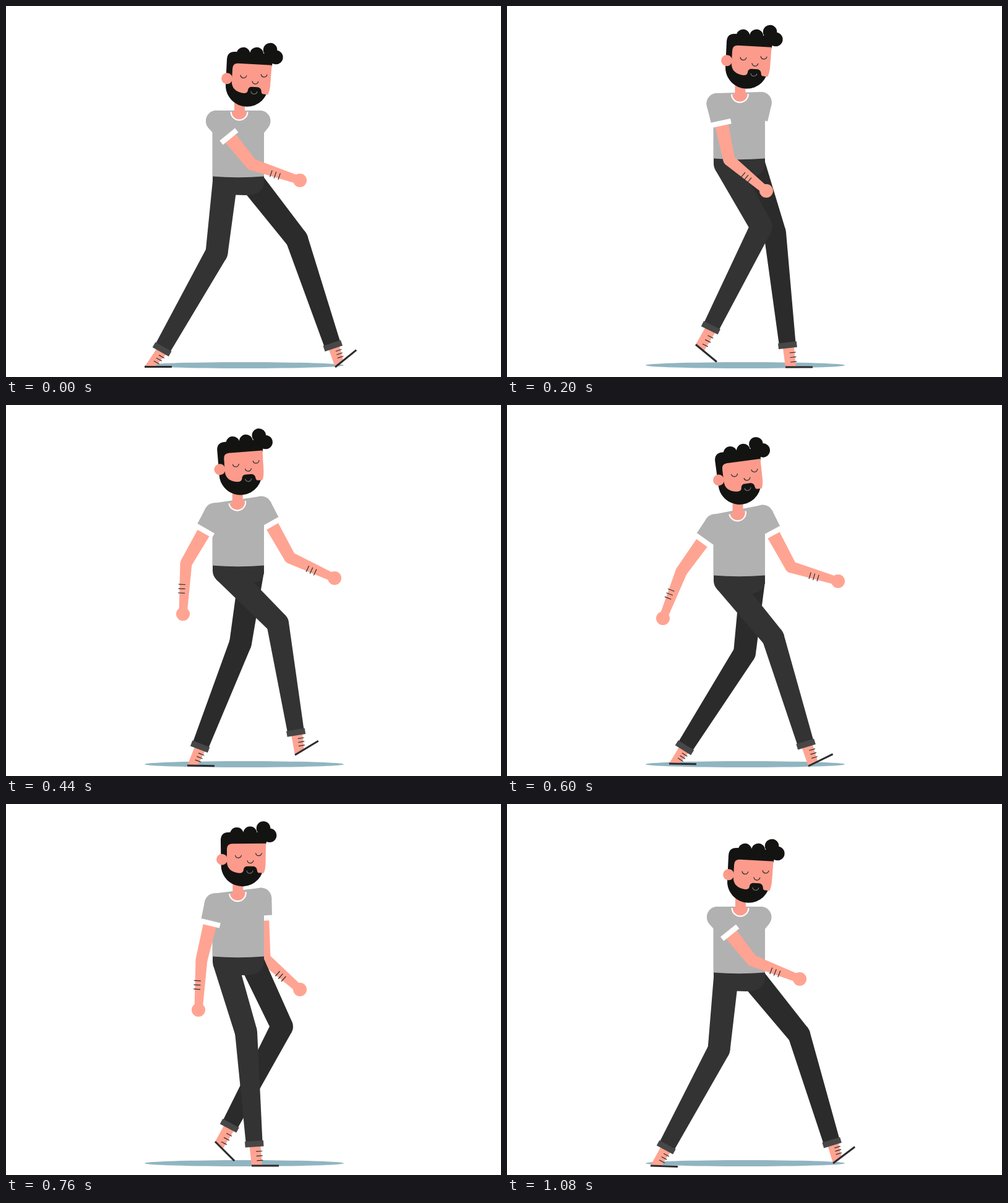
An HTML page with a canvas that plays this animation: 800x600 px, repeating every 1.12 s.

```html
<!DOCTYPE html>
<html lang="en">
<head>
<meta charset="utf-8">
<title>Walk cycle</title>
<style>
html, body { margin: 0; width: 100%; height: 100%; overflow: hidden; background: #fff; }
canvas { display: block; width: 800px; height: 600px; }
</style>
</head>
<body>
<canvas id="stage" width="800" height="600"></canvas>
<script>
const ctx = document.getElementById('stage').getContext('2d');
const STEP = 40, CYCLE = 28, HALF = 14;
const SKIN = '#ffa492', FACE = '#fc9b8b', HAIR = '#131412', SHIRT = '#b1b1b1';
const PANTS = '#333333', PANTS_FAR = '#2b2b2b', CUFF = '#474747', INK = '#2b2b2f';

const KEYS = [0, 5, 11, 15, 19, 23, 27];

// Periodic cubic through uneven keys.
function track(ts, vs, period = CYCLE) {
  const n = ts.length;
  const gap = i => (ts[(i + 1) % n] - ts[i] + period) % period;
  const slope = i => (vs[(i + 1) % n] - vs[i]) / gap(i);
  const tangent = i => {
    const p = (i + n - 1) % n;
    return (gap(i) * slope(p) + gap(p) * slope(i)) / (gap(p) + gap(i));
  };
  return t => {
    t = (t % period + period) % period;
    let i = n - 1;
    while (i > 0 && ts[i] > t) i--;
    const h = gap(i), s = (t - ts[i]) / h, j = (i + 1) % n;
    const s2 = s * s, s3 = s2 * s;
    return vs[i] * (2 * s3 - 3 * s2 + 1) + vs[j] * (3 * s2 - 2 * s3) +
      h * (tangent(i) * (s3 - 2 * s2 + s) + tangent(j) * (s3 - s2));
  };
}

const lift = track([0, 1, 5, 9, 11, 13], [0, 0, -29, -29, -16, -3], HALF);
const tilt = track(KEYS, [0, 1, 5.5, 7.5, 4.5, 0, 0]);
const headX = track(KEYS, [380, 378, 368.5, 365, 372, 378, 381]);
const headTurn = track(KEYS, [3.5, 3.5, -4, -7, 0, 3.5, 3.5]);
const belt = t => 276 + lift(t);

const shoulderNear = t => [340 - tilt(t) * 0.5, belt(t) - 90 + tilt(t)];
const shoulderFar = t => [410.5 + tilt(t) * 0.4, belt(t) - 90 - tilt(t)];

// Per key: knee x y, ankle x y, heel x y, sole angle.
const LEG_NEAR = [
  [340.5, 399, 254, 552, 224, 583.5, 0],
  [411, 357, 331, 517, 305, 547.5, 39.5],
  [439, 353, 468, 526, 467, 566, -31],
  [430, 376, 482, 545, 487, 584, -26],
  [388, 369, 401, 546, 397, 585, 0],
  [348, 374, 321, 547, 306, 585.5, 1],
  [342.5, 397, 259, 552, 232, 585, 2]
];
const LEG_FAR = [
  [470, 377, 527, 546, 532, 584, -39],
  [433, 367, 453, 545, 450, 584, 0],
  [379, 385, 315, 549, 293, 583, 1],
  [384, 401, 289, 551, 262, 580, 1],
  [446, 360, 363, 517, 338, 546, 45],
  [483, 338, 464, 510, 452, 545, -10],
  [472, 373, 524, 544, 527, 581, -37]
];
// Distance between the legs half a cycle apart.
const MEAN = [40, 0.5, 42, -0.5, 43, -1, 0], SWAY = [5, -2.5, 10, -0.5, 10, 0, 0];
const spread = (t, c) => MEAN[c] + SWAY[c] * Math.cos(2 * Math.PI * (t - 19) / CYCLE);

// Each leg also learns from the other leg's opposite phase.
function legTracks(own, other, sign) {
  return MEAN.map((_, c) => {
    const pts = KEYS.map((t, i) => [t, own[i][c]]);
    KEYS.forEach((t, i) => {
      const u = (t + HALF) % CYCLE;
      if (!KEYS.includes(u)) pts.push([u, other[i][c] + sign * spread(sign > 0 ? t : u, c)]);
    });
    pts.sort((a, b) => a[0] - b[0]);
    return track(pts.map(p => p[0]), pts.map(p => p[1]));
  });
}
const legNear = legTracks(LEG_NEAR, LEG_FAR, -1);
const legFar = legTracks(LEG_FAR, LEG_NEAR, 1);

// Per key: elbow x y, hand x y; stored as swinging angles and lengths.
function armTracks(shoulder, rows) {
  const polar = (a, b) => {
    const x = b[0] - a[0], y = b[1] - a[1];
    return [Math.atan2(x, y), Math.hypot(x, y)];
  };
  const vals = rows.map((r, i) => {
    const e = r.slice(0, 2);
    return [...polar(shoulder(KEYS[i]), e), ...polar(e, r.slice(2))];
  });
  return [0, 1, 2, 3].map(c => track(KEYS, vals.map(v => v[c])));
}
const armNear = armTracks(shoulderNear, [
  [397, 256, 475, 282], [359, 249, 419, 299], [291, 256, 286, 338],
  [282, 269, 252, 345], [316, 252, 311, 333], [371, 246, 414, 312], [396, 253, 473, 283]
]);
const armFar = armTracks(shoulderFar, [
  [357, 259, 350, 340], [393, 246, 404, 325], [459, 247, 531, 280],
  [459, 262, 535, 285], [418, 250, 475, 300], [374, 238, 386, 317], [357, 255, 351, 337]
]);

const along = (p, d, k) => [p[0] + d[0] * k, p[1] + d[1] * k];
const mix = (a, b, k) => [a[0] + (b[0] - a[0]) * k, a[1] + (b[1] - a[1]) * k];
const right = d => [d[1], -d[0]];
function unit(a, b) {
  const x = b[0] - a[0], y = b[1] - a[1], l = Math.hypot(x, y);
  return [x / l, y / l];
}

function poly(color, ...pts) {
  ctx.fillStyle = color;
  ctx.beginPath();
  pts.forEach(p => ctx.lineTo(p[0], p[1]));
  ctx.fill();
}
function disc(color, p, r) {
  ctx.fillStyle = color;
  ctx.beginPath();
  ctx.arc(p[0], p[1], r, 0, 2 * Math.PI);
  ctx.fill();
}
function line(a, b, width, color = INK) {
  ctx.strokeStyle = color;
  ctx.lineWidth = width;
  ctx.beginPath();
  ctx.moveTo(a[0], a[1]);
  ctx.lineTo(b[0], b[1]);
  ctx.stroke();
}
function taper(color, a, b, wa, wb) {
  const n = right(unit(a, b));
  poly(color, along(a, n, -wa), along(a, n, wa), along(b, n, wb), along(b, n, -wb));
}

function drawLeg(tracks, t, hip, color) {
  const [kx, ky, ax, ay, hx, hy, deg] = tracks.map(f => f(t));
  const knee = [kx, ky], ankle = [ax, ay], heel = [hx, hy];
  const down = unit(knee, ankle), front = right(down);
  const turn = deg * Math.PI / 180, sole = [Math.cos(turn), Math.sin(turn)];

  const top = along(along(ankle, down, 6), front, 1);
  const shin = along(top, front, 9), toe = along(heel, sole, 17);
  poly(SKIN, along(top, front, -9), shin, toe, heel);
  for (const k of [0.3, 0.52, 0.74]) {
    const p = mix(shin, toe, k);
    line(along(p, front, -8), along(p, front, 2), 1.2);
  }
  line(heel, along(heel, sole, 44), 3);

  disc(color, hip, 20);
  taper(color, hip, knee, 20, 18);
  disc(color, knee, 18);
  taper(color, knee, ankle, 18, 13.5);
  taper(CUFF, along(ankle, down, -1), along(ankle, down, 8.5), 15, 15);
}

function drawArm(tracks, t, shoulder) {
  const [a, la, b, lb] = tracks.map(f => f(t));
  const upper = [Math.sin(a), Math.cos(a)], fore = [Math.sin(b), Math.cos(b)];
  const elbow = along(shoulder, upper, la), hand = along(elbow, fore, lb);
  taper(SKIN, along(shoulder, upper, 30), elbow, 11, 9.5);
  disc(SKIN, elbow, 9.5);
  taper(SKIN, elbow, hand, 9.5, 6.5);
  disc(SKIN, hand, 11);
  const side = right(fore);
  for (const k of [0.42, 0.505, 0.59]) {
    const p = along(elbow, fore, lb * k);
    line(along(p, side, -10), along(p, side, 1), 1.2);
  }
  disc(SHIRT, shoulder, 17);
  taper(SHIRT, shoulder, along(shoulder, upper, 29), 17, 16);
  taper('#fff', along(shoulder, upper, 28), along(shoulder, upper, 36.5), 16, 16);
}

function drawPelvis(y) {
  ctx.fillStyle = PANTS;
  ctx.beginPath();
  ctx.moveTo(334, y - 4);
  ctx.lineTo(417, y - 4);
  ctx.lineTo(417, y + 10);
  ctx.quadraticCurveTo(415, y + 30, 386, y + 30);
  ctx.lineTo(356, y + 29);
  ctx.lineTo(334, y + 8);
  ctx.fill();
}

function drawShirt(y, l, r, lean) {
  ctx.fillStyle = SHIRT;
  ctx.beginPath();
  ctx.moveTo(l[0], l[1] - 17);
  ctx.lineTo(r[0], r[1] - 17);
  ctx.lineTo(417, r[1]);
  ctx.lineTo(417, y - 0.5);
  ctx.quadraticCurveTo(375, y + 3, 333.5, y - 0.5);
  ctx.lineTo(333.5, l[1]);
  ctx.fill();
  disc(SHIRT, l, 17);

  const x = 377 - lean * 0.6, cy = y - 105 + lean * 0.4;
  const turn = Math.atan2(r[1] - l[1], r[0] - l[0]);
  for (const [color, radius] of [['#fff', 14.5], [FACE, 12.3]]) {
    ctx.fillStyle = color;
    ctx.beginPath();
    ctx.arc(x, cy, radius, turn, turn + Math.PI);
    ctx.fill();
  }
  ctx.fillStyle = FACE;
  ctx.fillRect(x - 8, cy - 30, 17, 34);
}

function smile(x, y, color) {
  ctx.strokeStyle = color;
  ctx.lineWidth = 1.2;
  ctx.beginPath();
  ctx.arc(x, y, 5, 0.1, Math.PI - 0.1);
  ctx.stroke();
}

function drawHead(x, y, deg) {
  ctx.save();
  ctx.translate(x, y);
  ctx.rotate(deg * Math.PI / 180);
  ctx.translate(-372, -91);

  ctx.fillStyle = HAIR;
  ctx.beginPath();
  ctx.moveTo(347.5, 99);
  ctx.lineTo(347, 59);
  ctx.quadraticCurveTo(347, 46, 360, 46);
  ctx.lineTo(424, 46);
  ctx.lineTo(420, 66);
  ctx.lineTo(400, 100);
  ctx.lineTo(416.5, 110);
  ctx.arc(382, 99, 34.5, 0.35, Math.PI);
  ctx.fill();
  for (const [cx, cy, r] of [[373, 49, 11], [394.5, 47.5, 11], [416, 39.5, 11.3], [426, 51, 11.3]])
    disc(HAIR, [cx, cy], r);

  ctx.fillStyle = FACE;
  ctx.beginPath();
  ctx.moveTo(357, 73);
  ctx.quadraticCurveTo(357, 65, 365, 64.5);
  ctx.lineTo(420, 64);
  ctx.lineTo(419.5, 98);
  ctx.quadraticCurveTo(419, 107, 416.5, 112);
  ctx.lineTo(408, 111.5);
  ctx.quadraticCurveTo(406, 111, 405.5, 106);
  ctx.quadraticCurveTo(404, 101, 399, 101);
  ctx.lineTo(390, 101);
  ctx.quadraticCurveTo(385, 101, 384, 106);
  ctx.quadraticCurveTo(384, 112, 377, 112);
  ctx.quadraticCurveTo(357, 110, 357, 93);
  ctx.fill();
  disc(FACE, [349, 90], 9);

  smile(375.5, 82.5, INK);
  smile(408.5, 79, INK);
  smile(395, 91, INK);
  smile(394, 107.5, '#77716f');
  ctx.restore();
}

function draw(t) {
  const y = belt(t), l = shoulderNear(t), r = shoulderFar(t);
  ctx.fillStyle = '#fff';
  ctx.fillRect(0, 0, 800, 600);
  ctx.fillStyle = '#90b5c1';
  ctx.beginPath();
  ctx.ellipse(385, 581, 161, 5, 0, 0, 2 * Math.PI);
  ctx.fill();

  drawArm(armFar, t, r);
  drawLeg(legFar, t, [397, y + 8], PANTS_FAR);
  drawPelvis(y);
  drawLeg(legNear, t, [354, y + 8], PANTS);
  drawShirt(y, l, r, tilt(t));
  drawHead(headX(t), y - 156.3, headTurn(t));
  drawArm(armNear, t, l);
}

function tick() {
  draw(Math.floor(performance.now() / STEP) % CYCLE);
  requestAnimationFrame(tick);
}
tick();
</script>
</body>
</html>
```
